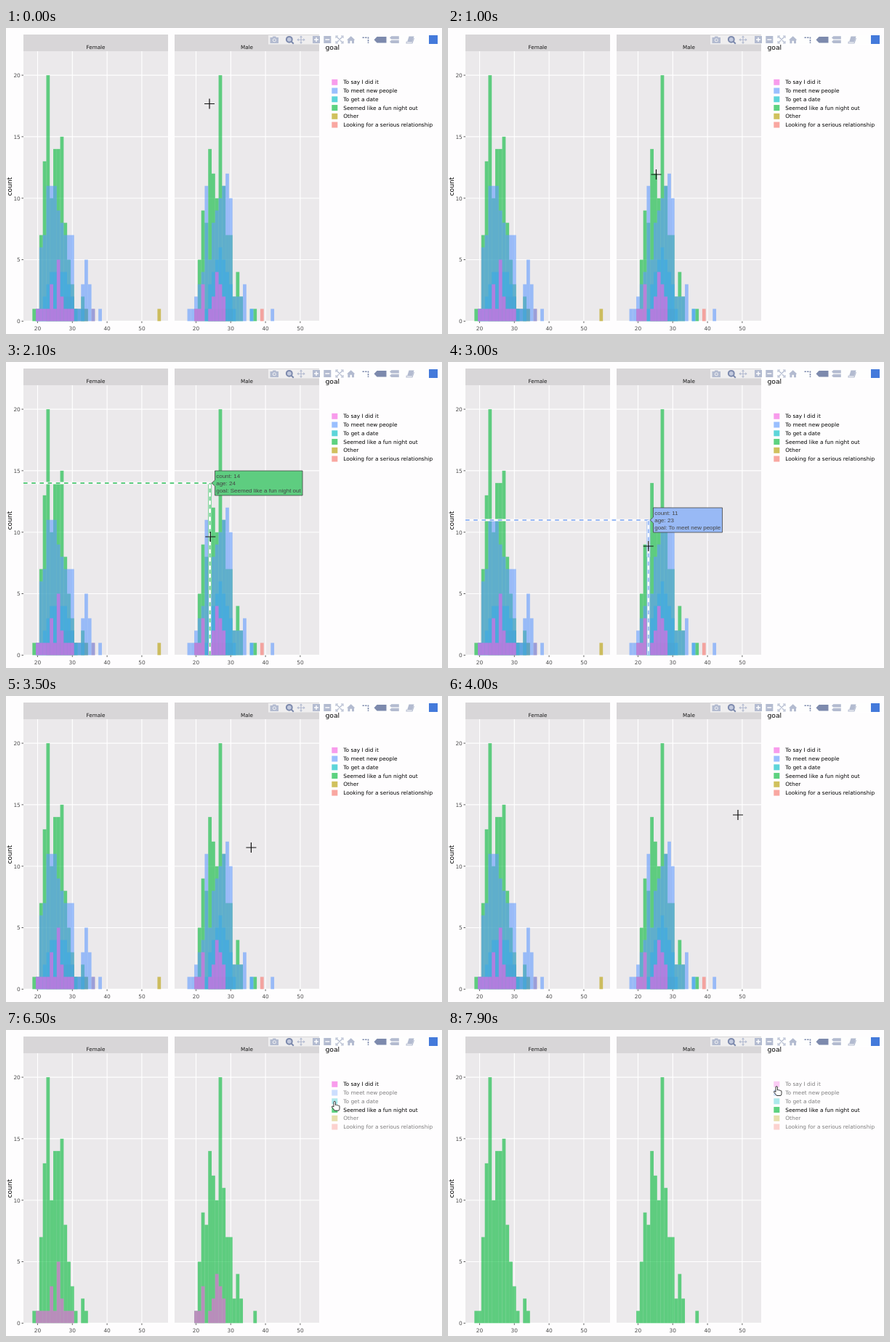
These frames come from a looping animation (600 px wide and 422 px high, 8 s). An HTML page:

```html
<!DOCTYPE html>
<html lang="en">
<head>
<meta charset="utf-8">
<title>Age histogram by goal</title>
<style>
html, body { margin: 0; width: 100%; height: 100%; overflow: hidden; background: #fefdfe; }
svg { display: block; width: 600px; height: 422px; }
text { font-family: "DejaVu Sans", Verdana, sans-serif; font-size: 7.4px; }
.title { font-size: 9.2px; fill: #000; }
.tick { fill: #4d4d4d; }
.strip { font-size: 7.2px; fill: #1a1a1a; }
.tip { font-family: "Liberation Sans", Arial, sans-serif; font-size: 8px; fill: #444; }
.bars { fill-opacity: .6; }
</style>
</head>
<body>
<svg id="stage" viewBox="0 0 600 422"></svg>
<script>
const LOOP = 8000, STEP = 100;
const stage = document.getElementById('stage');

function add(parent, tag, attrs = {}, text) {
  const el = document.createElementNS('http://www.w3.org/2000/svg', tag);
  for (const k in attrs) el.setAttribute(k, attrs[k]);
  if (text !== undefined) el.textContent = text;
  parent.appendChild(el);
  return el;
}
const rect = (p, x, y, width, height, fill, more) => add(p, 'rect', { x, y, width, height, fill, ...more });
const path = (p, d, more) => add(p, 'path', { d, fill: 'none', ...more });
const show = (el, on) => el.setAttribute('display', on ? 'inline' : 'none');

// Scales
const YEAR = 4.78, UNIT = 16.96, BASE = 404.3;
const panels = [
  { label: 'Female', left: 24, age20: 43.5 },
  { label: 'Male', left: 232, age20: 261.5 }
];
const ageX = (panel, age) => panels[panel].age20 + (age - 20) * YEAR;
const countY = n => BASE - n * UNIT;

// Count by age: straight runs between "age:count" points.
function outline(...runs) {
  const parsed = runs.map(run => run.split(' ').map(p => p.split(':').map(Number)));
  return age => {
    for (const run of parsed) {
      const i = run.findIndex(p => p[0] >= age);
      if (i < 0) continue;
      const [a1, n1] = run[i];
      if (a1 === age) return n1;
      if (i === 0) continue;
      const [a0, n0] = run[i - 1];
      return Math.floor(n0 + (n1 - n0) * (age - a0) / (a1 - a0));
    }
    return 0;
  };
}
// Count by age: a bell curve plus one lone visitor.
const bell = (peak, mean, spread, loner) => age =>
  age === loner ? 1 : Math.floor(peak * Math.exp(-(((age - mean) / spread) ** 2) / 2));

// Back to front, counts for each panel.
const traces = [
  { name: 'Looking for a serious relationship', color: '#F8766D',
    counts: [bell(2.2, 28.5, 5, 36), bell(1.4, 27, 4, 39)] },
  { name: 'Other', color: '#B79F00', counts: [outline('55:1'), () => 0] },
  { name: 'Seemed like a fun night out', color: '#00BA38', tip: '#5ecd80', counts: [
    outline('19:1 20:1 22:13 23:20 24:10 25:14 27:15 28:8 31:1', '33:2 34:1'),
    outline('20:1 22:9 23:8 24:14 26:10 27:20 28:11 29:7 30:7 31:2 32:4 33:2', '37:1')] },
  { name: 'To get a date', color: '#00BFC4',
    counts: [bell(5, 26, 3.5, 33), bell(6, 27, 2.6, 36)] },
  { name: 'To meet new people', color: '#619CFF', tip: '#98b9f5', counts: [
    outline('20:1 21:6 22:7 23:11 25:11 28:7 30:7 31:1 32:1 34:5 36:1', '38:1'),
    outline('18:1 22:4 23:11 24:5 25:8 29:12 30:10 31:2 33:2 34:3', '36:1', '42:1')] },
  { name: 'To say I did it', color: '#F564E3', counts: [
    outline('20:1 23:1 24:3 25:1 26:5 27:2 28:1 30:1'),
    outline('20:1 21:1 22:3 23:0 24:1 26:4 28:2')] }
];
const FUN = 2, SAY = 5;

function drawPanels() {
  const grid = { stroke: '#fff', 'stroke-width': 1.15 };
  const mark = { stroke: '#333', 'stroke-width': .8 };
  panels.forEach(({ left, label }, i) => {
    rect(stage, left, 32, 199, 372.5, '#ebe9eb');
    for (let n = 0; n <= 20; n += 5) path(stage, `M${left} ${countY(n)}h199`, grid);
    for (let age = 20; age <= 50; age += 10) {
      const x = ageX(i, age);
      path(stage, `M${x} 32V404.5`, grid);
      path(stage, `M${x} 404.5v2.3`, mark);
      add(stage, 'text', { x, y: 417, class: 'tick', 'text-anchor': 'middle' }, age);
    }
    rect(stage, left, 9, 199, 23, '#d8d6d8');
    add(stage, 'text', { x: left + 99.5, y: 29, class: 'strip', 'text-anchor': 'middle' }, label);
  });
  for (let n = 0; n <= 20; n += 5) {
    path(stage, `M21.5 ${countY(n)}H24`, mark);
    add(stage, 'text', { x: 19.8, y: countY(n) + 2.8, class: 'tick', 'text-anchor': 'end' }, n);
  }
  add(stage, 'text', { class: 'title', transform: 'translate(8 218.5) rotate(-90)', 'text-anchor': 'middle' }, 'count');
}

function drawTraces() {
  traces.forEach((trace, i) => {
    trace.bars = add(stage, 'g', { class: 'bars', fill: trace.color });
    trace.counts.forEach((count, panel) => {
      for (let age = 18; age <= 55; age++) {
        const height = count(age) * UNIT;
        if (height) add(trace.bars, 'rect', { x: ageX(panel, age - .5), y: BASE - height, width: YEAR, height });
      }
    });
    const y = 74.8 + (SAY - i) * 11.75;
    trace.key = add(stage, 'g');
    rect(trace.key, 448.3, y - 4, 8, 8, trace.color, { 'fill-opacity': .63 });
    add(trace.key, 'text', { x: 464.3, y: y + 2.6 }, trace.name);
  });
  add(stage, 'text', { x: 439.5, y: 29.5, class: 'title' }, 'goal');
}

function drawToolbar() {
  const soft = '#b3bbd0', dark = '#7d8aad';
  const bar = add(stage, 'g');
  const line = (d, stroke = soft, w = 1.1, dash = 'none') =>
    path(bar, d, { stroke, 'stroke-width': w, 'stroke-dasharray': dash });
  const solid = (d, fill = soft) => path(bar, d, { fill });
  rect(bar, 361, 10, 237, 12.5, '#fff', { 'fill-opacity': .6 });
  // camera
  solid('M363.5 13h3l1-1.5h3.5l1 1.5h3v8h-11.5z');
  add(bar, 'circle', { cx: 369.3, cy: 16.8, r: 2, fill: soft, stroke: '#f2f2f5' });
  // zoom
  add(bar, 'circle', { cx: 389.8, cy: 15.8, r: 3.9, fill: '#c3cade', stroke: dark, 'stroke-width': 2 });
  line('M392.5 18.5l3.3 3.3', dark, 2);
  // pan
  line('M401.5 16.3h9M406 11.8v9');
  solid('M406 10.5l2 2.5h-4zM406 22l2-2.5h-4zM400.3 16.3l2.5-2v4zM411.7 16.3l-2.5-2v4z');
  // zoom in and out
  for (const x of [422, 437.3]) {
    rect(bar, x, 11, 10, 10, soft);
    line(`M${x + 2} 16h6`, '#fff', 1.4);
  }
  line('M427 13v6', '#fff', 1.4);
  // autoscale
  line('M454 14v-3h3M461 11h3v3M464 18v3h-3M457 21h-3v-3M455 12l8 8M463 12l-8 8');
  // reset
  solid('M469 16.5l5.7-5.3 5.7 5.3h-1.4v4.7h-3v-3.4h-2.6v3.4h-3v-4.7z');
  // spike lines
  line('M490.5 13.2h8V21', dark, 1.6, '2.4 1.2');
  // hover modes
  solid('M506.5 16.2l4-4.2h13v8.4h-13z', dark);
  solid('M528 13.4l2.3-2.2h10.5v4.4h-10.5zM528 18.9l2.3-2.2h10.5v4.4h-10.5z');
  // sheets
  solid('M554.5 11.5h7l-2.5 8h-7z');
  line('M551.3 18.5l-.3 2.5h8l2.5-7');
  rect(bar, 582, 10, 12, 12, '#447adb');
}

// Tallest bar under a point, if any.
function barAt([x, y]) {
  const panel = x < panels[1].left ? 0 : 1;
  const age = Math.round(20 + (x - panels[panel].age20) / YEAR);
  let best = { n: 0 };
  for (const trace of traces) {
    const n = trace.counts[panel](age);
    if (n > best.n) best = { trace, panel, age, n };
  }
  return best.n && y > countY(best.n) ? best : null;
}

function drawHover(bar) {
  hoverLayer.replaceChildren();
  if (!bar) return;
  const { trace, panel, age, n } = bar;
  const fill = trace.tip || trace.color;
  const x = ageX(panel, age), y = Math.round(countY(n));
  for (const d of [`M24 ${y}H${x}`, `M${x} 404V${y}`]) {
    path(hoverLayer, d, { stroke: '#fdfcfd', 'stroke-width': 3.2 });
    path(hoverLayer, d, { stroke: fill, 'stroke-width': 1.9, 'stroke-dasharray': '5.6 5.6' });
  }
  const tipX = x + YEAR / 2, left = Math.floor(tipX + 4) + .5;
  const box = path(hoverLayer, '', { fill, stroke: '#444', 'stroke-width': .8 });
  let width = 0;
  [`count: ${n}`, `age: ${age}`, `goal: ${trace.name}`].forEach((s, i) => {
    const line = add(hoverLayer, 'text', { x: left + 1.7, y: y - 7.4 + i * 10.4, class: 'tip' }, s);
    width = Math.max(width, line.getComputedTextLength() + 4);
  });
  box.setAttribute('d', `M${tipX} ${y}L${left} ${y - 4}V${y - 17}h${width}v34H${left}V${y + 4}Z`);
}

// Pointer stops: time, x, y.
const stops = [
  [0, 280, 104.5], [1000, 286.5, 202], [2100, 281.3, 241], [3000, 275.8, 254], [4000, 399, 164],
  [4700, 452, 76], [5600, 452, 76], [6200, 452, 112], [6900, 452, 78], [LOOP, 452, 78]
];
function pointerAt(t) {
  const i = stops.findIndex(s => s[0] > t);
  const [t0, x0, y0] = stops[i - 1], [t1, x1, y1] = stops[i];
  const k = (t - t0) / (t1 - t0), ease = k * k * (3 - 2 * k);
  return [x0 + (x1 - x0) * ease, y0 + (y1 - y0) * ease];
}

// Legend clicks: isolate "say", add "fun", drop "say".
function visible(i, t) {
  if (t < 5000) return true;
  return i === SAY ? t < 7200 : i === FUN && t >= 6400;
}

drawPanels();
drawTraces();
drawToolbar();
const hoverLayer = add(stage, 'g');
const cross = path(stage, 'M-7 0H7M0-7V7', { stroke: '#111', 'stroke-width': 1.2 });
const hand = path(stage,
  'M-1 1Q-1-.3 .2-.3T1.4 1V5Q2.6 4 3.6 5.2 5 4.4 5.6 5.8 7 5.3 7 7V9.5Q7 11 6 12.5H.3Q-1.5 10-3.6 7.6-3.6 6-2 6.6L-1 7.5Z',
  { fill: '#fff', stroke: '#222', 'stroke-width': .9, 'stroke-linejoin': 'round' });

function draw(t) {
  const [x, y] = pointerAt(t);
  const overLegend = x > 436;
  for (const el of [cross, hand]) el.setAttribute('transform', `translate(${x} ${y})`);
  show(cross, !overLegend);
  show(hand, overLegend);
  traces.forEach(({ bars, key }, i) => {
    show(bars, visible(i, t));
    key.setAttribute('opacity', visible(i, t) ? 1 : .5);
  });
  // The tooltip trails the pointer by one step.
  drawHover(overLegend ? null : barAt(pointerAt(Math.max(0, t - STEP))));
}

const start = performance.now();
let drawn;
function tick() {
  const t = Math.floor((performance.now() - start) % LOOP / STEP) * STEP;
  if (t !== drawn) draw(drawn = t);
  requestAnimationFrame(tick);
}
tick();
</script>
</body>
</html>
```
